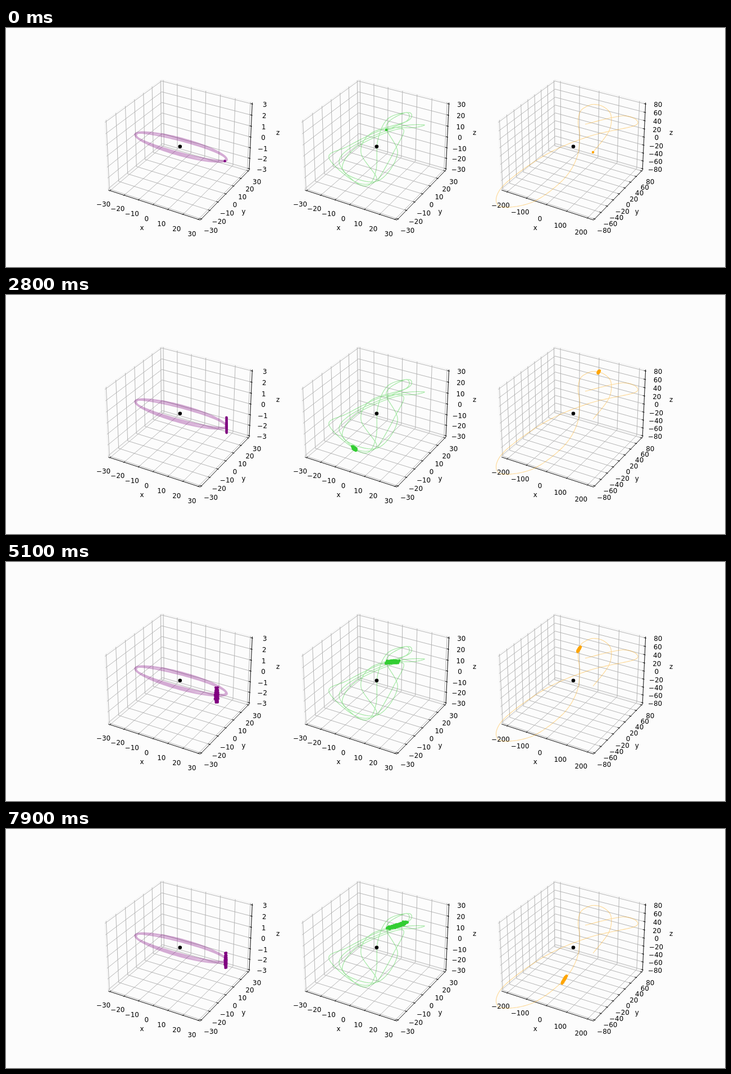
Animation of 1280x427 px, one loop 8 s. Source, as an HTML page with a canvas:

```html
<!DOCTYPE html>
<html lang="en">
<head>
<meta charset="utf-8">
<title>Orbits</title>
<style>
  html, body { margin: 0; width: 100%; height: 100%; overflow: hidden; background: #fcfcfc; }
  canvas { display: block; width: 1280px; height: 427px; }
</style>
</head>
<body>
<canvas id="stage" width="1280" height="427"></canvas>
<script>
const ctx = document.getElementById('stage').getContext('2d');
const LOOP = 8000, STEP = 100, COUNT = 350;
const CENTER = [309.8, 211.7], GAP = 350.1, SCALE = 1577;
const PAD = 25 / 24, LINE = 0.95;

// Perspective view of a 4:4:3 box, 30 degrees up and turned by -60 degrees.
function project(x, y, z) {
  x *= 0.5714; y *= 0.5714; z *= 0.4286;
  const right = 0.866 * x + 0.5 * y;
  const up = -0.25 * x + 0.433 * y + 0.866 * z;
  const depth = 10 - (0.433 * x - 0.75 * y + 0.5 * z);
  return [CENTER[0] + SCALE * right / depth, CENTER[1] - SCALE * up / depth];
}

function stroke(points, color, width) {
  ctx.beginPath();
  points.forEach(([x, y]) => ctx.lineTo(x, y));
  ctx.strokeStyle = color;
  ctx.lineWidth = width;
  ctx.stroke();
}

const line3d = (points, color) => stroke(points.map(p => project(...p)), color, LINE);

function dots(points, r, color) {
  ctx.beginPath();
  for (const [x, y] of points) {
    ctx.moveTo(x + r, y);
    ctx.arc(x, y, r, 0, 2 * Math.PI);
  }
  ctx.fillStyle = color;
  ctx.fill();
}

function label(text, x, y) {
  ctx.fillText(String(text).replace('-', '\u2212'), x, y + 4.3);
}

function ticks(limit, step, last = limit) {
  const list = [];
  for (let v = -last; v <= last; v += step) list.push([v / limit, v]);
  return list;
}

function drawAxes([xTicks, yTicks, zTicks]) {
  const p = PAD, inner = p - 0.035, outer = p + 0.017, far = p + 0.242;
  const pane = '#efefef', grid = '#b0b0b0', ink = '#000';

  line3d([[-p, -p, -p], [-p, p, -p], [-p, p, p], [-p, -p, p], [-p, -p, -p]], pane);
  line3d([[-p, p, -p], [p, p, -p], [p, p, p], [-p, p, p]], pane);

  for (const [v] of xTicks) line3d([[v, -p, -p], [v, p, -p], [v, p, p]], grid);
  for (const [v] of yTicks) line3d([[p, v, -p], [-p, v, -p], [-p, v, p]], grid);
  for (const [v] of zTicks) line3d([[-p, -p, v], [-p, p, v], [p, p, v]], grid);
  line3d([[-p, -p, -p], [p, -p, -p], [p, p, -p], [p, p, p]], ink);

  ctx.fillStyle = ink;
  for (const [v, text] of xTicks) {
    line3d([[v, -inner, -p], [v, -outer, -p]], ink);
    const [x, y] = project(v, -far, -far);
    label(text, x, y);
  }
  for (const [v, text] of yTicks) {
    line3d([[inner, v, -p], [outer, v, -p]], ink);
    const [x, y] = project(far, v, -far);
    label(text, x - 3, y);
  }
  for (const [v, text] of zTicks) {
    line3d([[inner, p, v], [outer, p, v]], ink);
    const [x, y] = project(p, p, v);
    label(text, x + 22.3, y + 1.3);
  }
  label('x', 242, 356.5);
  label('y', 423, 328);
  label('z', 484, 187);
}

// Smooth curve through key points that are evenly spaced in time.
function spline(keys) {
  const last = keys.length - 1;
  const key = i => keys[Math.max(0, Math.min(last, i))];
  const point = u => {
    u = Math.max(0, Math.min(last - 0.001, u));
    const i = Math.floor(u), f = u - i;
    return [0, 1].map(k => {
      const [a, b, c, d] = [-1, 0, 1, 2].map(n => key(i + n)[k]);
      return b + f / 2 * (c - a + f * (2 * a - 5 * b + 4 * c - d + f * (3 * (b - c) + d - a)));
    });
  };
  const trace = Array.from({ length: last * 20 + 1 }, (_, i) => point(i / 20));
  return { point, trace };
}

function ring(angle, a, b) {
  const c = Math.cos(angle);
  return [311.5 + a * c, 212.5 + 0.268 * a * c + b * Math.sin(angle)];
}

const ringTrace = Array.from({ length: 7 * 90 }, (_, i) => {
  const q = i * 2 * Math.PI / 90;
  return ring(q, 81 + 2 * Math.cos(0.63 * q), 13.3 + 3 * Math.cos(0.29 * q + 1));
});

// One key every 0.4 s.
const greenPath = spline([
  [677, 182], [718, 164], [717, 151], [680, 162], [662, 200], [659, 253], [645, 281],
  [620, 274], [593, 238], [625, 207], [697, 177], [744, 173], [726, 178], [673, 181],
  [607, 212], [575, 232], [624, 276], [660, 270], [632, 223], [650, 188], [712, 167],
  [712, 151], [677, 175], [697, 225], [660, 274], [600, 255], [625, 212], [705, 180],
  [690, 222], [661, 274]
]);

// One key every 0.8 s.
const orangePath = spline([
  [1045, 222], [1073, 185], [1077, 156], [1064, 141], [1046, 136.5], [1032, 141],
  [1022, 150], [1018.5, 169], [1021.5, 196], [1015, 235], [989, 274], [935, 312],
  [878, 318], [884, 283], [960, 227], [1040, 193], [1122, 173], [1100, 157], [1031, 172]
]);

let seed = 7;
const random = () => (seed = seed * 16807 % 2147483647) / 2147483647;
const bell = () => (random() + random() + random()) * 2 / 3 - 1;
const particles = Array.from({ length: COUNT }, () => [bell(), bell(), bell()]);

function purpleAt(t, [along, across]) {
  const angle = 0.29 - 2.397 * t + 0.05 * Math.sin(Math.PI * t / 7.9) + 0.014 * t * along;
  const [x, y] = ring(angle, 81.5, 15 - 10 * (t / 8) ** 4);
  return [x, y + 16 * Math.min(1, t) * across];
}

function greenAt(t, [along, dx, dy]) {
  const [x, y] = greenPath.point((t + 0.019 * t * along) / 0.4);
  const spread = Math.min(3, 0.9 * t);
  return [x + spread * dx, y + spread * dy];
}

function orangeAt(t, [along, across]) {
  const [x, y] = orangePath.point(t / 0.8);
  const reach = 1.25 * t * along, side = Math.min(1.2, 0.4 * t) * across;
  return [x + 0.5 * reach + 0.85 * side, y - 0.85 * reach + 0.5 * side];
}

const tens = ticks(30, 10), twenties = ticks(80, 20);
const panels = [
  { axes: [tens, tens, ticks(3, 1)], trace: ringTrace, place: purpleAt,
    color: '#800080', faint: 'rgba(128,0,128,.32)', width: 1.5 },
  { axes: [tens, tens, tens], trace: greenPath.trace, place: greenAt,
    color: '#32cd32', faint: 'rgba(50,205,50,.43)', width: 1.2 },
  { axes: [ticks(220, 100, 200), twenties, twenties], trace: orangePath.trace, place: orangeAt,
    color: '#ffa500', faint: 'rgba(255,165,0,.42)', width: 1.1 }
];

function draw(now) {
  const t = Math.floor((now % LOOP) / STEP) * STEP / 1000;
  ctx.fillStyle = '#fcfcfc';
  ctx.fillRect(0, 0, 1280, 427);
  ctx.font = '11.85px "DejaVu Sans", sans-serif';
  ctx.textAlign = 'center';
  ctx.lineJoin = 'round';

  panels.forEach(({ axes, trace, place, color, faint, width }, i) => {
    ctx.save();
    ctx.translate(i * GAP, 0);
    drawAxes(axes);
    ctx.restore();
    stroke(trace, faint, width);
    dots(particles.map(p => place(t, p)), 2.3, color);
    dots([[CENTER[0] + i * GAP, CENTER[1]]], 3.3, '#000');
  });
}

const start = performance.now();
function tick() {
  draw(performance.now() - start);
  requestAnimationFrame(tick);
}
tick();
</script>
</body>
</html>
```
